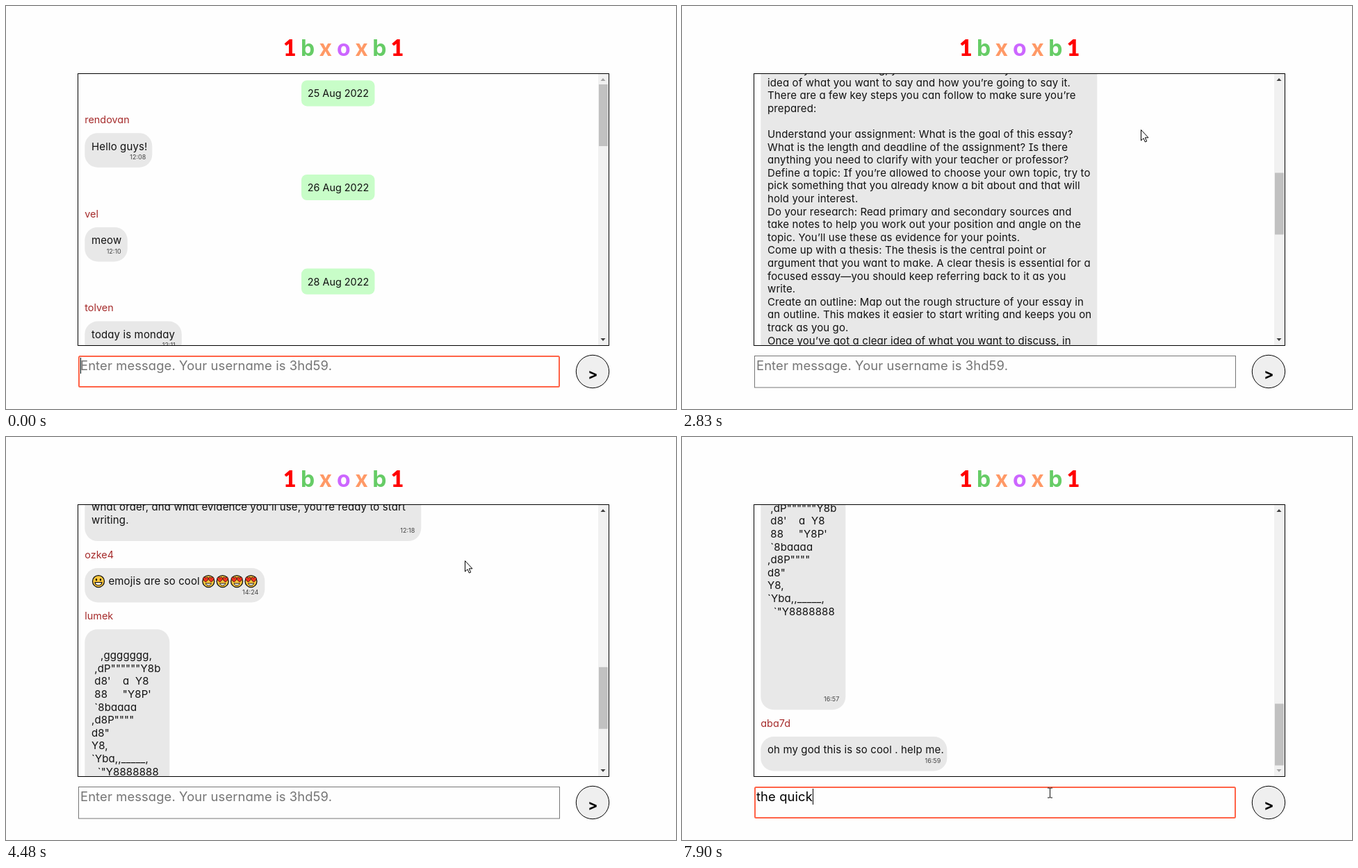
Animation of 964 by 581 pixels, one loop 8000 ms. Source, as an HTML page:

```html
<!DOCTYPE html>
<html lang="en">
<head>
<meta charset="utf-8">
<title>Chat room</title>
<style>
  html, body { margin: 0; width: 100%; height: 100%; overflow: hidden; background: #fefefe; }
  svg { display: block; width: 964px; height: 581px; }
  text {
    font: 15px Inter, "Open Sans", sans-serif;
    font-feature-settings: "cv11", "cv08";
    letter-spacing: .12px;
    white-space: pre;
    fill: #111;
  }
  .title { font-size: 32px; font-weight: 700; text-anchor: middle; letter-spacing: 0; }
  .one { font-family: Lato, sans-serif; font-weight: 900; }
  .date { font-size: 14.4px; text-anchor: middle; letter-spacing: 0; }
  .name { font-size: 14.4px; fill: #a52a2a; letter-spacing: 0; }
  .time { font-size: 9px; fill: #444; text-anchor: end; letter-spacing: 0; }
  .field { font-size: 18.4px; letter-spacing: .1px; }
  .send { font-size: 21px; font-weight: 700; text-anchor: middle; fill: #000; }
</style>
</head>
<body>
<svg viewBox="0 0 964 581">
  <defs>
    <clipPath id="view"><rect x="104" y="98" width="748" height="391"/></clipPath>
    <g id="face">
      <circle r="8.5" fill="#ffc83d" stroke="#111" stroke-width="1.3"/>
    </g>
    <g id="grin">
      <use href="#face"/>
      <ellipse cx="-3" cy="-2.4" rx="1.2" ry="1.7"/>
      <ellipse cx="3" cy="-2.4" rx="1.2" ry="1.7"/>
      <path d="M-5 1.5H5C4.6 7-4.6 7-5 1.5Z" fill="#fff" stroke="#111" stroke-width="1.1"/>
    </g>
    <path id="heart" d="M0 3.6C-5.6 0-4-4.2-1.6-3.5Q-.4-3.2 0-2Q.4-3.2 1.6-3.5C4-4.2 5.6 0 0 3.6Z"
      fill="#f0321e" stroke="#111" stroke-width=".7"/>
    <g id="love">
      <use href="#face"/>
      <use href="#heart" x="-4" y="-2.5"/>
      <use href="#heart" x="4" y="-2.5"/>
      <path d="M-4 3H4C3.4 7-3.4 7-4 3Z" fill="#fff" stroke="#111" stroke-width="1"/>
    </g>
  </defs>
  <rect width="964" height="581" fill="#fefefe"/>
  <g id="title"></g>

  <g clip-path="url(#view)"><g id="feed"></g></g>
  <rect x="852" y="98" width="15" height="391" fill="#f1f1f1"/>
  <rect id="thumb" x="853" y="113" width="13" height="89" fill="#c1c1c1"/>
  <path id="up" d="M855.5 108H862.5L859 104Z"/>
  <path id="down" d="M855.5 479H862.5L859 483Z"/>
  <rect x="103.5" y="97.5" width="764" height="392" fill="none" stroke="#000"/>

  <rect id="box" fill="#fefefe"/>
  <text id="typed" class="field" x="107" y="525"></text>
  <rect id="caret" y="507" width="1" height="23"/>

  <circle cx="844" cy="527" r="23.7" fill="#efefef" stroke="#000"/>
  <text class="send" x="844.5" y="537.5">&gt;</text>

  <path id="arrow" d="M.5.5V16L4 12.7L6.4 18L8.7 17L6.3 11.8H11Z" fill="#fff" stroke="#000"/>
  <path id="beam" d="M-3.5-7H-1Q0-7 0-6Q0-7 1-7H3.5M0-6V6M-3.5 7H-1Q0 7 0 6Q0 7 1 7H3.5"
    fill="none" stroke="#111"/>
</svg>
<script>
const $ = id => document.getElementById(id);

function add(parent, tag, attrs, text = '') {
  const el = document.createElementNS('http://www.w3.org/2000/svg', tag);
  set(el, attrs);
  el.textContent = text;
  parent.append(el);
  return el;
}

function set(el, attrs) {
  for (const key in attrs) el.setAttribute(key, attrs[key]);
}

const show = (el, on) => set(el, { visibility: on ? 'visible' : 'hidden' });

// Title
const hues = { 1: '#f00', b: '#66cc66', x: '#ff9966', o: '#cc66ff' };
[...'1bxoxb1'].forEach((ch, i) => add($('title'), 'text', {
  class: ch === '1' ? 'title one' : 'title', x: 408.3 + i * 25.8, y: 72, style: 'fill:' + hues[ch]
}, ch));

// Message feed, laid out from top to bottom
const LINE = 18.6, GAP = 38.8, LEFT = 113.3;
const feed = $('feed');
let top_ = 107.2;

function date(label) {
  add(feed, 'rect', { x: 425, y: top_, width: 105.5, height: 37.2, rx: 8, fill: '#c8fdc8' });
  add(feed, 'text', { class: 'date', x: 478, y: top_ + 24 }, label);
  top_ += 37.2 + GAP;
}

function message(name, time, width, body, x = 123) {
  const lines = body.split('\n');
  const height = 30.9 + lines.length * LINE;
  const base = top_ + 24.4;
  add(feed, 'text', { class: 'name', x: LEFT, y: top_ - 14.3 }, name);
  add(feed, 'rect', { x: LEFT, y: top_, width, height, rx: 18.6, fill: '#e8e8e8' });
  lines.forEach((line, i) => add(feed, 'text', { x, y: base + i * LINE }, line));
  add(feed, 'text', { class: 'time', x: LEFT + width - 9, y: top_ + height - 11.8 }, time);
  top_ += height + GAP;
  return base;
}

const nextDay = label => { top_ -= GAP - 10.2; date(label); };

date('25 Aug 2022');
message('rendovan', '12:08', 97, 'Hello guys!');
nextDay('26 Aug 2022');
message('vel', '12:10', 61.5, 'meow');
nextDay('28 Aug 2022');
message('tolven', '12:11', 139.5, 'today is monday');
message('8hnd2', '12:11', 200, 'How do I write an essay?');
message('mopp5', '12:18', 484, `Before you start writing, you should make sure you have a clear
idea of what you want to say and how you’re going to say it.
There are a few key steps you can follow to make sure you’re
prepared:

Understand your assignment: What is the goal of this essay?
What is the length and deadline of the assignment? Is there
anything you need to clarify with your teacher or professor?
Define a topic: If you’re allowed to choose your own topic, try to
pick something that you already know a bit about and that will
hold your interest.
Do your research: Read primary and secondary sources and
take notes to help you work out your position and angle on the
topic. You’ll use these as evidence for your points.
Come up with a thesis: The thesis is the central point or
argument that you want to make. A clear thesis is essential for a
focused essay—you should keep referring back to it as you
write.
Create an outline: Map out the rough structure of your essay in
an outline. This makes it easier to start writing and keeps you on
track as you go.
Once you’ve got a clear idea of what you want to discuss, in
what order, and what evidence you’ll use, you’re ready to start
writing.`);
const emojiY = message('ozke4', '14:24', 259, 'emojis are so cool', 147.5) - 5.2;
add(feed, 'use', { href: '#grin', x: 133, y: emojiY });
for (let i = 0; i < 4; i++) add(feed, 'use', { href: '#love', x: 291.3 + i * 20.4, y: emojiY });
message('lumek', '16:57', 122, `
   ,ggggggg,
 ,dP""""""Y8b
 d8'    a  Y8
 88     "Y8P'
 \`8baaaa
,d8P""""
d8"
Y8,
\`Yba,,_____,
  \`"Y8888888` + '\n'.repeat(6));
message('aba7d', '16:59', 268, 'oh my god this is so cool . help me.');

// Motion: each leg is start, end, number of steps, then distance
const NOTCH = 93.1, MAX = 1189.5;
const wheel = [
  [1170, 1350, 5, 1], [1550, 1750, 5, 1], [2130, 2330, 5, 2], [2670, 2830, 4, 2],
  [3440, 3640, 5, 2], [3800, 4280, 10, 2], [4420, 4960, 11, MAX / NOTCH - 10]
];
const mouse = [
  [140, 240, 3, 13, 127.5], [530, 770, 6, 7, 74], [5440, 5640, 5, -117, 300],
  [5840, 5940, 3, -14, 30], [6100, 6140, 2, 0, 5]
];
const keys = [[6880, 't'], [6920, 'h'], [7120, 'e'], [7160, ' '], [7420, 'q'],
  [7500, 'u'], [7700, 'i'], [7900, 'ck']];
const hint = 'Enter message. Your username is 3hd59.';

function progress(t, [start, end, n]) {
  if (t < start) return 0;
  return Math.min(1, (Math.floor((t - start) / (end - start) * (n - 1) + 1e-6) + 1) / n);
}

const smooth = p => p * p * (3 - 2 * p);
const flick = p => 1 - (1 - p) ** 1.35;
const glide = p => .2 * p + .8 * smooth(p);

function scrollAt(t) {
  return wheel.reduce((sum, leg) => {
    const ease = leg[2] < 10 ? flick : glide;
    return sum + leg[3] * NOTCH * ease(progress(t, leg));
  }, 0);
}

function mouseAt(t) {
  let x = 640, y = -23.5;
  mouse.forEach((leg, i) => {
    const p = progress(t, leg), k = i ? smooth(p) : p;
    x += leg[3] * k;
    y += leg[4] * k;
  });
  return [Math.round(x), Math.round(y)];
}

function drawField(t, hover) {
  const focus = t < 140 || t >= 6100;
  set($('box'), focus
    ? { x: 105, y: 505, width: 691, height: 44, rx: 1.5, stroke: '#ff6347', 'stroke-width': 2 }
    : { x: 104.5, y: 504.5, width: 692, height: 45.5, rx: 0, stroke: hover ? '#000' : '#767676', 'stroke-width': 1 });

  const value = keys.filter(k => t >= k[0]).map(k => k[1]).join('');
  const field = $('typed');
  const text = value || hint;
  if (field.textContent !== text) field.textContent = text;
  field.style.fill = value ? '#000' : '#757575';
  set($('caret'), { x: Math.round(107 + (value ? field.getComputedTextLength() : 0)) });
  show($('caret'), focus && !(t >= 6620 && t < 6880));
}

function draw(t) {
  const y = scrollAt(t);
  set(feed, { transform: `translate(0 ${-y})` });
  set($('thumb'), { y: 113 + y * 271.5 / MAX });
  set($('up'), { fill: y < 1 ? '#a3a3a3' : '#404040' });
  set($('down'), { fill: y > MAX - 1 ? '#a3a3a3' : '#404040' });

  const [mx, my] = mouseAt(t);
  const inField = my > 499;
  show($('arrow'), t >= 140 && !inField);
  show($('beam'), inField);
  set($('arrow'), { transform: `translate(${mx} ${my})` });
  set($('beam'), { transform: `translate(${mx + .5} ${my})` });
  drawField(t, inField);
}

const began = performance.now();
function tick() {
  draw((performance.now() - began) % 8000);
  requestAnimationFrame(tick);
}
tick();
</script>
</body>
</html>
```
